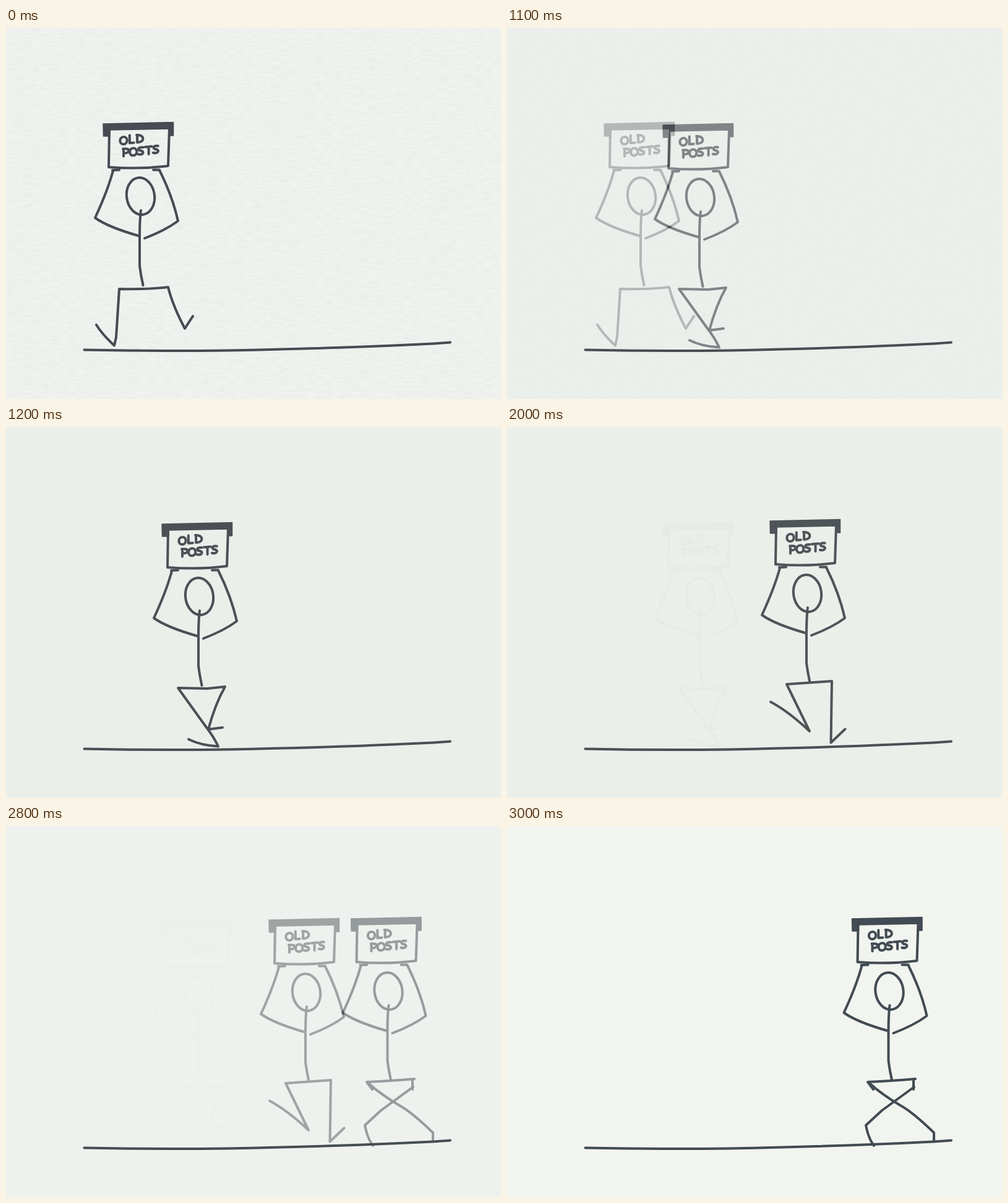
An HTML page that plays this animation: 800 px wide and 600 px high, repeating every 3.9 s.

```html
<!DOCTYPE html>
<html lang="en">
<head>
<meta charset="utf-8">
<title>Carrying old posts</title>
<style>
  html, body { margin: 0; width: 100%; height: 100%; overflow: hidden; }
  svg { display: block; width: 100vw; height: 100vh; }
  .lines { fill: none; stroke: currentColor; stroke-width: 4; stroke-linecap: round; stroke-linejoin: round; }
  .lid { fill: currentColor; stroke-width: 1.5; }
  .soft { filter: blur(.6px); }
</style>
</head>
<body>
<svg id="stage" viewBox="0 0 800 600" role="img" aria-label="A stick figure carries a box labelled OLD POSTS">
  <defs>
    <filter id="paper" x="0" y="0" width="100%" height="100%">
      <feTurbulence type="fractalNoise" baseFrequency=".07 .28" numOctaves="2" seed="4"/>
      <feColorMatrix values="0 0 0 0 0  0 0 0 0 0  0 0 0 0 0  .05 0 0 0 -.015"/>
    </filter>
    <path id="ground" d="M126.500 520.500 Q240 523 360 521.500 Q540 518 690 510.500 L718 508.500"/>
    <g id="carrier">
      <path class="lid" d="M157 155 L270.500 152.500 V174 H264.500 V163 L168 165 V175 H157.500Z"/>
      <path d="M167 164 L166 225 Q215 229 262 223 L264 163"/>
      <path d="M172 230 L183 229.500 M238 229.500 H248"/>
      <path d="M173 231 Q164 264 144 307 Q165 322 214 336"/>
      <path d="M248 230 Q269 272 278 312 Q258 327 224 340"/>
      <ellipse cx="217.500" cy="272" rx="22.500" ry="30" transform="rotate(-8 217.500 272)"/>
      <path d="M218 295 Q216 310 216 340 V385 Q218 400 221.500 416"/>
      <g id="label"></g>
    </g>
  </defs>
</svg>
<script>
const LOOP = 3900, STEP = 100;
const byId = id => document.getElementById(id);

// Hand-drawn letters, each in a box of about 11 by 13.
const glyphs = {
  O: "M6 1 C-2 1 -2 13 5 13 C13 13 13 1 6 1Z",
  L: "M2 0 V12.500 L9 12",
  D: "M1 1 V13 C14 13 13 0 0 1",
  P: "M2 1 V13 M1 1 C14 -1 13 8 3 8",
  S: "M9 1 C1 0 0 5 4 6 C13 7 9 14 1 12",
  T: "M0 1.500 L11 .5 M6 1 V13"
};
const write = (word, x, y, advance, rise) => [...word].map((letter, i) =>
  `<path d="${glyphs[letter]}" transform="translate(${x + i * advance} ${y - i * rise})"/>`).join("");

byId("label").innerHTML = write("OLD", 184.5, 175, 13.3, 1.5) + write("POSTS", 188, 194.5, 12.2, 1.2);

// Each slide dissolves over the previous one in a few equal steps.
const slides = [
  { start: 0, steps: 1, cover: 1, paper: "#f0f3f0", ink: "#474b53", grain: true, x: 0, y: 0,
    legs: "M146 480 Q155 495 175 513.500 L178 500 L183 422 Q230 423 262 419 Q269 448 289 486 L302 466" },
  { start: 1000, steps: 3, cover: 1, paper: "#eaefea", ink: "#4b5056", soft: true, x: 95, y: 2,
    legs: "M295 505 Q315 515 343 516.500 Q335 500 324 486 L278 422 L325 423 L354 420 Q338 448 327 489 L350 486" },
  { start: 1900, steps: 2, cover: .98, paper: "#eaefea", ink: "#4b5056", soft: true, x: 268, y: -3,
    legs: "M426 444.500 Q455 460 489 492 L452 416 Q495 413 525 411 L523.500 510.500 L546.500 488.500" },
  { start: 2800, steps: 2, cover: 1, paper: "#f1f4ef", ink: "#424b53", x: 400.5, y: -5,
    legs: `M592 426 L583 414 Q625 412 660 409 M657 410 V426 M658 422 L606 460 L580 484 Q584 505 593 517
      M587 417 Q607 435 636 452 Q656 463 690 496 V510` }
];

byId("stage").innerHTML += slides.map(({ paper, ink, grain, soft, x, y, legs }) => `
  <g class="slide" color="${ink}">
    <rect width="800" height="600" fill="${paper}"/>
    ${grain ? '<rect width="800" height="600" filter="url(#paper)"/>' : ""}
    <g class="lines ${soft ? "soft" : ""}">
      <use href="#ground"/>
      <use href="#carrier" x="${x}" y="${y}"/>
      <path d="${legs}"/>
    </g>
  </g>`).join("");
const layers = document.querySelectorAll(".slide");

function draw(now) {
  const time = now % LOOP;
  slides.forEach(({ start, steps, cover }, i) => {
    const progress = (Math.floor((time - start) / STEP) + 1) / steps;
    layers[i].style.opacity = cover * Math.min(1, Math.max(0, progress));
  });
  requestAnimationFrame(draw);
}
draw(0);
</script>
</body>
</html>
```
